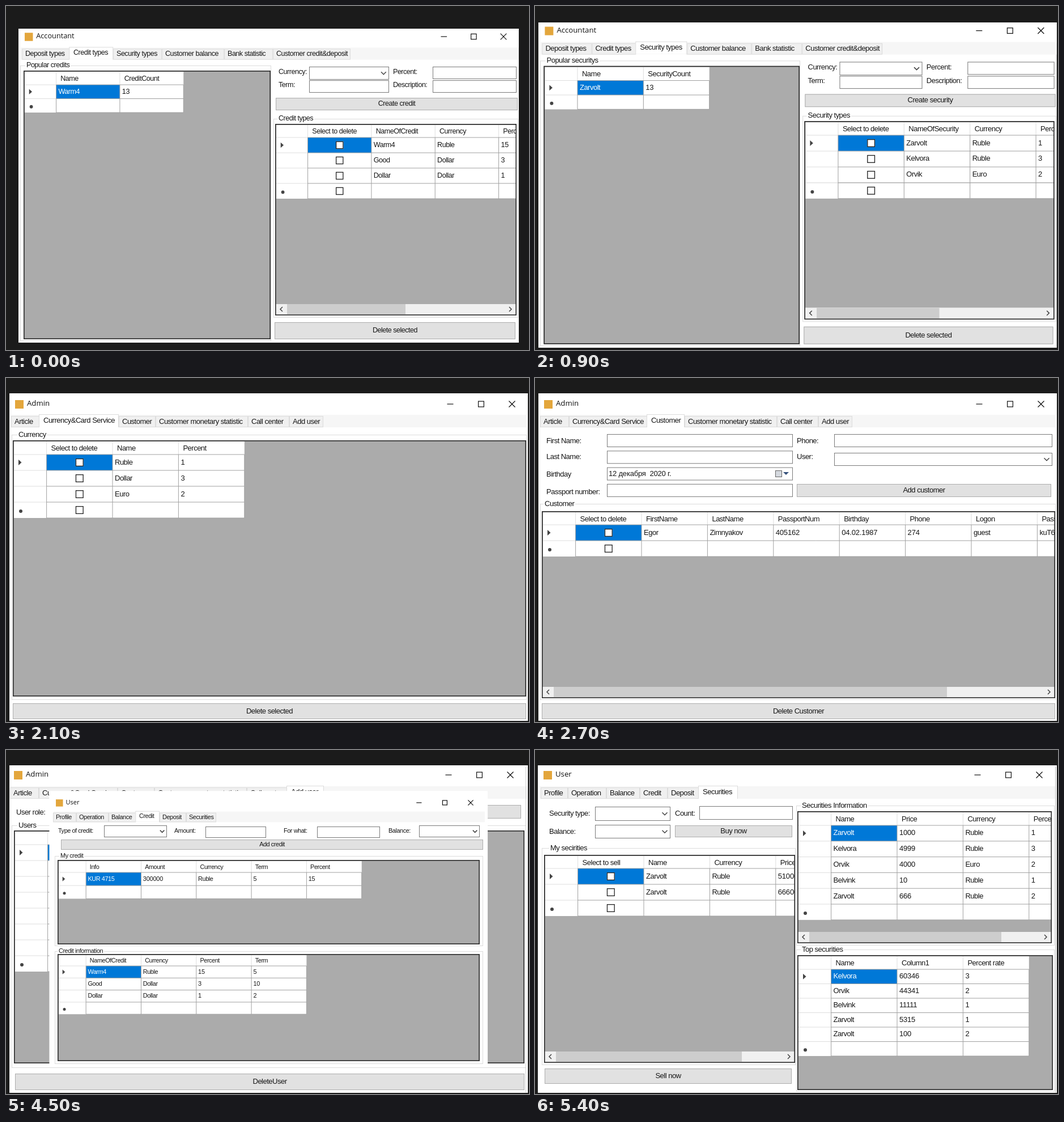
Animation of 923 by 607 pixels, one loop 5.7 s. Source, as an HTML page with a canvas:

```html
<!DOCTYPE html>
<html lang="en">
<head>
<meta charset="utf-8">
<title>Bank desktop tour</title>
<style>
html, body { margin: 0; width: 100%; height: 100%; overflow: hidden; background: #1b1b1b; }
canvas { display: block; }
</style>
</head>
<body>
<canvas id="stage" width="923" height="607"></canvas>
<script>
const c = document.getElementById('stage').getContext('2d');
const STEP = 300;
const BLUE = '#0078d7';
const ACCOUNTANT = 'Deposit types|Credit types|Security types|Customer balance|Bank statistic|Customer credit&deposit';
const ADMIN = 'Article|Currency&Card Service|Customer|Customer monetary statistic|Call center|Add user';
const USER = 'Profile|Operation|Balance|Credit|Deposit|Securities';
let S = 1; // scale of text and grid columns in the current window

function rect(x, y, w, h, fill, line, width = 1) {
  if (fill) { c.fillStyle = fill; c.fillRect(x, y, w, h); }
  if (line) {
    c.strokeStyle = line;
    c.lineWidth = width;
    c.strokeRect(x + width / 2, y + width / 2, w - width, h - width);
  }
}

function path(points, color, width = 1) {
  c.beginPath();
  points.forEach(([x, y]) => c.lineTo(x, y));
  c.strokeStyle = color;
  c.lineWidth = width;
  c.stroke();
}

function poly(points, color) {
  c.beginPath();
  points.forEach(([x, y]) => c.lineTo(x, y));
  c.fillStyle = color;
  c.fill();
}

function dot(x, y, r, color = '#111') {
  c.beginPath();
  c.arc(x, y, r, 0, 7);
  c.fillStyle = color;
  c.fill();
}

function text(s, x, y, color = '#161616', align = 'left') {
  c.font = `${13 * S}px "Liberation Sans", Arial, sans-serif`;
  c.letterSpacing = `${(/^\d/.test(s) ? -0.2 : -0.5) * S}px`;
  c.textBaseline = 'middle';
  c.textAlign = align;
  c.fillStyle = color;
  c.fillText(s, x, y);
}

function chevron(x, y, turns, size = 4) {
  c.save();
  c.translate(x, y);
  c.rotate(turns * Math.PI / 2);
  path([[-size, -size / 2], [0, size / 2], [size, -size / 2]], '#444', 1.5);
  c.restore();
}

function field(x, y, r, b, value = '') {
  rect(x, y, r - x, b - y, '#fff', '#7a7a7a');
  text(value, x + 3, (y + b) / 2);
}

function combo(x, y, r, b, value) {
  field(x, y, r, b, value);
  chevron(r - 10 * S, (y + b) / 2, 0, 4.5 * S);
}

function button(x, y, r, b, label, focus) {
  rect(x, y, r - x, b - y, '#e1e1e1', focus ? BLUE : '#adadad', focus ? 2.5 : 1);
  text(label, (x + r) / 2, (y + b) / 2, undefined, 'center');
}

function group(label, x, y, left, right, bottom) {
  rect(left, y, right - left, bottom - y, null, '#dcdcdc');
  text(label, x, y);
  const w = c.measureText(label).width;
  rect(x - 2, y - 7, w + 4, 14, '#fff');
  text(label, x, y);
}

function scrollbar(x, y, length, from, to, vertical) {
  const w = 18;
  if (vertical) {
    rect(x, y, w, length, '#f0f0f0');
    rect(x, from, w, to - from, '#cdcdcd');
    chevron(x + w / 2, y + 10, 2);
    chevron(x + w / 2, y + length - 9, 0);
  } else {
    rect(x, y, length, w, '#f0f0f0');
    rect(from, y, to - from, w, '#cdcdcd');
    chevron(x + 10, y + w / 2, 1);
    chevron(x + length - 10, y + w / 2, 3);
  }
}

// hs and vs hold the start and end of the scroll thumbs
function grid(x, y, r, b, head, row, names, rows, { check = false, star = true, hs, vs } = {}) {
  const w = r - x, h = b - y;
  const cols = names.split('|');
  const x0 = x + 2, y0 = y + 2, first = x0 + 57.6 * S, cw = 116.4 * S;
  const count = rows.length + (star ? 1 : 0);
  const right = first + cols.length * cw, bottom = y0 + head + count * row;
  c.save();
  c.beginPath();
  c.rect(x, y, w, h);
  c.clip();
  rect(x, y, w, h, '#ababab');
  rect(x0, y0, right - x0, bottom - y0, '#fff');
  cols.forEach((name, i) => {
    const left = first + i * cw, lines = name.split('\n');
    path([[left, y0], [left, y0 + head]], '#dedede');
    lines.forEach((line, k) =>
      text(line, left + 8 * S, y0 + head / 2 + (k - (lines.length - 1) / 2) * 15 + 1));
  });
  for (let j = 0; j < count; j++) {
    const top = y0 + head + j * row, mid = top + row / 2;
    const cells = (rows[j] || '').split('|');
    path([[x0, top], [first, top]], '#dedede');
    if (!j) rect(first, top, cw, row, BLUE);
    cols.forEach((_, i) => {
      const left = first + i * cw;
      if (check && !i) rect(left + cw / 2 - 7 * S, mid - 7 * S, 14 * S, 14 * S, '#fff', '#222', 1.3);
      else text(cells[i] || '', left + 4 * S, mid, i || j ? undefined : '#fff');
    });
  }
  for (let j = 0; j <= count; j++) {
    const top = y0 + head + j * row;
    path([[first, top], [right, top]], '#a0a0a0');
  }
  for (let i = 0; i <= cols.length; i++) {
    const left = first + i * cw;
    path([[left, y0 + head], [left, bottom]], '#a0a0a0');
  }
  const my = y0 + head + row / 2, mx = x0 + 8 * S;
  poly([[mx, my - 5 * S], [mx + 5.5 * S, my], [mx, my + 5 * S]], '#444');
  if (star) dot(x0 + 12 * S, bottom - row / 2 + 2, 3 * S, '#444');
  if (hs) {
    rect(x, b - 20, w, 20, '#f0f0f0');
    scrollbar(x + 1, b - 20, w - 2 - (vs ? 18 : 0), ...hs);
  }
  if (vs) scrollbar(r - 19, y + 2, h - 22, ...vs, true);
  c.restore();
  rect(x, y, w, h, null, '#2b2b2b', 1.6);
}

function frame(x, y, r, b, title, iconX, midY, closeX, body = '#fff') {
  rect(x, y, r - x, b - y, body);
  rect(x, y, r - x, 37 * S, '#fff');
  rect(iconX, midY - 7 * S, 15 * S, 15 * S, '#e3a63c');
  c.font = `${13.2 * S}px "Open Sans", "Noto Sans", sans-serif`;
  c.letterSpacing = '0px';
  c.textBaseline = 'middle';
  c.textAlign = 'left';
  c.fillStyle = '#111';
  c.fillText(title, iconX + 21 * S, midY);
  const a = 5.5 * S, min = closeX - 109 * S, max = closeX - 54.5 * S;
  path([[min - a, midY], [min + a, midY]], '#111', 1.2);
  rect(max - a, midY - a, 2 * a, 2 * a, null, '#111', 1.2);
  path([[closeX - a, midY - a], [closeX + a, midY + a]], '#111', 1.2);
  path([[closeX - a, midY + a], [closeX + a, midY - a]], '#111', 1.2);
}

// y is the middle of the resting tabs; the last x is where the strip of tabs ends
function tabs(names, xs, y, active, left, right) {
  const half = 10 * S;
  rect(left, y - half - 2, right - left, 2 * half + 2, '#f6f6f6');
  names.split('|').forEach((name, i) => {
    const on = i === active, x = xs[i] - (on ? 8 : 6) * S;
    const end = xs[i + 1] - (i === 5 ? 0 : 6 * S);
    const top = y - half - (on ? 3 : 0);
    rect(x, top, end - x, y + half - top, on ? '#fff' : '#f0f0f0', '#dcdcdc');
    if (on) rect(x + 1, y + half - 1, end - x - 2, 3, '#fff');
    text(name, xs[i], on ? y - 2 : y);
  });
}

function zoom(k, dx, dy, draw) {
  c.save();
  c.translate(dx, dy);
  c.scale(k, k);
  draw();
  c.restore();
}

function withScale(k, draw) {
  const old = S;
  S = k;
  draw();
  S = old;
}

const typesPage = (active, noun, rows) => withScale(0.965, () => {
  const low = noun.toLowerCase();
  frame(22, 40, 905, 594, 'Accountant', 33, 54, 878);
  tabs(ACCOUNTANT, [34, 119, 195, 281, 391, 477, 608], 85, active, 26, 905);
  group(`Popular ${low}s`, 36, 105, 25, 468, 591);
  grid(31, 114, 467, 588, 23, 24.5, `Name|${noun}Count`, [rows[0].split('|')[1] + '|13']);
  text('Currency:', 481, 117);
  combo(535, 107, 676, 130);
  text('Percent:', 683, 117);
  field(753, 107, 901, 129);
  text('Term:', 481, 140);
  field(535, 131, 676, 153);
  text('Description:', 683, 140);
  field(753, 131, 901, 153);
  button(476, 162, 903, 184, `Create ${low}`);
  group(`${noun} types`, 481, 199, 472, 904, 550);
  grid(475, 208, 901, 546, 22, 27, `Select to delete|NameOf${noun}|Currency|Percent|Term`, rows,
    { check: true, hs: [496, 705] });
  button(474, 558, 899, 588, 'Delete selected');
});

const CREDITS = ['|Warm4|Ruble|15|5', '|Good|Dollar|3|10', '|Dollar|Dollar|1|2'];
const DEPOSITS = ['|Dollar|Dollar|5|2', '|Сберегательный|Ruble|7|5', '|Сберегательный1|Ruble|4|3'];
const SHARES = ['|Zarvolt|Ruble|1|5', '|Kelvora|Ruble|3|2', '|Orvik|Euro|2|2'];
const enlarged = draw => zoom(1.036, -16.8, -12.4, draw);

function accountant(active, xs, iconX) {
  frame(6, 29, 921, 604, 'Accountant', iconX, 46, 892);
  tabs(ACCOUNTANT, xs, 78, active, 10, 919);
}

const F = 'Fedor|Lunkin|8', V = 'Vsevolod|Tuchin|3', E = 'Egor|Zimnyakov|3', K = 'Konstantin|Vetluhin|8',
  R = 'Ruslan|Kamyshov|8', G = 'Svyatogor|Drozdnov|8', M = 'Maksim|Mroz|2', L = 'Leonid|Pluzhin|2';

function customerDeals() {
  accountant(5, [17, 105, 183, 274, 387, 478, 615], 17);
  const list = people => people.map(p => '|' + p);
  const names = kind => `Select to\nterminate ${kind}|FirstName|LastName|PassportNum`;
  group('Customer credits', 24, 101, 14, 463, 555);
  grid(19, 110, 459, 547, 38, 27.95, names('credit'), list([F, V, V, ...Array(11).fill(E)]),
    { check: true, hs: [39, 186], vs: [131, 467] });
  group('Customer deposits', 478, 101, 469, 918, 555);
  grid(474, 110, 913, 548, 38, 25.6, names('deposit'),
    list([K, F, R, G, M, L, 'TEST_UPDATE|TEST|7', K, F, R, G, M, K, V, V]),
    { check: true, hs: [494, 640], vs: [131, 361] });
  button(18, 564, 457, 594, 'Terminate Credit');
  button(475, 564, 914, 594, 'Terminate Deposit');
}

function customerBalance() {
  accountant(3, [17, 105, 183, 274, 387, 475, 610], 17);
  group('Customer balance', 24, 101, 14, 918, 598);
  grid(19, 110, 913, 592, 23, 25.6, 'FirstName|LastName|Currency|Balance',
    [F, V, E, K, R].map((p, i) => p.slice(0, -2) + (i % 2 ? '|Dollar|100' : '|Ruble|5469500')));
}

function bankStatistic() {
  accountant(4, [19, 106, 185, 275, 388, 477, 611], 18);
  group('Share of currency', 21, 98, 12, 467, 340);
  grid(15, 107, 464, 340, 23, 25.5, 'Name|Type|Percent', [
    'Ruble|Balance|64,28571428571', 'Dollar|Balance|35,71428571428',
    'Ruble|Credit|92,85714285714', 'Dollar|Credit|7,14285714285',
    'Ruble|Deposite|65,21739130434', 'Dollar|Deposite|34,78260869565']);
  group('Bank payments from deposit', 480, 98, 470, 919, 340);
  grid(472, 107, 918, 340, 23, 27.8, 'Name|DepositName|Count', [
    'Dollar|Dollar|1028100450', 'Ruble|Сберегательный|3385466', 'Ruble|Сберегательный1|1099956']);
  rect(8, 328, 912, 16, '#fff');
  group('Money turnover', 25, 343, 12, 919, 603);
  grid(16, 355, 918, 601, 23, 25.5, 'Name|DepositAmount|BalanceAmount|CreditAmount', [
    ...['100', '105', '5000605', '5469500'].map(n => `Ruble|4435422|${n}|210300000`),
    ...['100', '137'].map(n => `Dollar|34270015|${n}|4000000`)]);
}

function admin(active) {
  frame(6, 27, 921, 605, 'Admin', 16, 46, 893);
  tabs(ADMIN, [15, 66, 205, 270, 433, 506, 560], 77, active, 9, 919);
}

function adminList(active, label, names, rows) {
  admin(active);
  group(label, 22, 100, 10, 919, 568);
  grid(12, 110, 918, 562, 23, 28, names, rows, { check: true });
  button(12, 574, 918, 602, 'Delete selected');
}

function customers() {
  admin(2);
  ['First Name:', 'Last Name:', 'Birthday', 'Passport number:'].forEach((label, i) => {
    const y = 99 + i * 29.3;
    text(label, 20, [111, 139, 170, 201][i]);
    field(127, y, 455, y + 23, i === 2 ? '12 декабря  2020 г.' : '');
  });
  rect(424, 163, 12, 12, '#d5d9df', '#666');
  poly([[438, 166], [448, 166], [443, 171]], '#34507a');
  text('Phone:', 462, 111);
  field(528, 99, 913, 122);
  text('User:', 462, 139);
  combo(528, 132, 913, 155);
  button(462, 187, 911, 210, 'Add customer');
  group('Customer', 17, 222, 9, 919, 568);
  grid(12, 235, 918, 565, 22, 28,
    'Select to delete|FirstName|LastName|PassportNum|Birthday|Phone|Logon|Password',
    ['|Egor|Zimnyakov|405162|04.02.1987|274|guest|kuT6'], { check: true, hs: [33, 727] });
  button(12, 574, 918, 602, 'Delete Customer');
}

function addUser() {
  frame(6, 27, 921, 605, 'Admin', 14, 44, 890);
  tabs(ADMIN, [13, 64, 203, 268, 431, 503, 561], 76, 5, 8, 919);
  text('User role:', 18, 110);
  combo(90, 98, 440, 121);
  button(460, 97, 909, 121, 'Add user');
  group('Users', 22, 133, 10, 918, 561);
  grid(14, 142, 915, 553, 23, 28, 'Select to delete|Logon|Password|Role',
    Array(7).fill('|guest|kuT6|Customer'), { check: true });
  button(16, 571, 915, 600, 'DeleteUser');
  path([[917.5, 29], [917.5, 604]], '#cfcfcf');
}

function authentication() {
  addUser();
  withScale(1.07, () => {
    frame(94, 71, 835, 562, 'Authentication', 104, 90, 808, '#f0f0f0');
    text('Logon:', 270, 251);
    field(364, 237, 628, 262, 'guest');
    text('Password:', 270, 292);
    field(364, 283, 628, 308);
    [372, 380.5, 389].forEach(x => dot(x, 296, 3.4));
    text('Account type:', 270, 339);
    combo(364, 327, 628, 353, 'Customer');
    button(270, 422, 624, 450, 'Log in', true);
  });
}

const userPage = (active, noun) => withScale(0.836, () => {
  const low = noun.toLowerCase();
  frame(79, 74, 848, 556, 'User', 88, 93, 820);
  tabs(USER, [88, 129, 186, 235, 276, 323, 371], 119, active, 84, 845);
  text(`Type of ${low}:`, 92, 143);
  combo(173, 133, 284, 154);
  text('Amount:', 297, 143);
  field(352, 135, 459, 155);
  text('For what:', 490, 143);
  field(549, 135, 660, 155);
  text('Balance:', 675, 143);
  combo(729, 133, 836, 154);
  button(97, 158, 842, 176, `Add ${low}`);
  group(`My ${low}`, 96, 187, 86, 842, 346);
  grid(91, 194, 836, 343, 20, 23.2, 'Info|Amount|Currency|Term|Percent', ['KUR 4715|300000|Ruble|5|15']);
  group(`${noun} information`, 93, 355, 86, 842, 554);
  grid(91, 360, 836, 549, 19, 21.3, `NameOf${noun}|Currency|Percent|Term`,
    ['Warm4|Ruble|15|5', 'Good|Dollar|3|10', 'Dollar|Dollar|1|2']);
});

const deposit = () => zoom(1.19, -89, -61, () => userPage(4, 'Deposit'));

function operation() {
  addUser();
  zoom(1.006, -3, -2, () => userPage(1, 'Operation'));
}

function securities() {
  frame(5, 27, 921, 605, 'User', 15, 44, 890);
  tabs(USER, [16, 64, 132, 191, 240, 296, 358], 76, 5, 8, 919);
  text('Security type:', 25, 112);
  combo(106, 100, 239, 125);
  text('Count:', 247, 112);
  field(290, 99, 455, 123);
  text('Balance:', 25, 144);
  combo(106, 132, 239, 156);
  button(247, 133, 454, 154, 'Buy now');
  group('My secirities', 27, 173, 12, 460, 556);
  grid(16, 185, 459, 552, 22, 28, 'Select to sell|Name|Currency|Price',
    ['|Zarvolt|Ruble|51000', '|Zarvolt|Ruble|66600'], { check: true, hs: [37, 365] });
  button(17, 562, 453, 589, 'Sell now');
  group('Securities Information', 471, 98, 461, 917, 345);
  grid(463, 108, 912, 341, 23, 27.8, 'Name|Price|Currency|Percent', [
    'Zarvolt|1000|Ruble|1', 'Kelvora|4999|Ruble|3', 'Orvik|4000|Euro|2',
    'Belvink|10|Ruble|1', 'Zarvolt|666|Ruble|2'], { hs: [484, 823] });
  group('Top securities', 471, 352, 461, 917, 603);
  grid(463, 362, 914, 600, 23, 25.5, 'Name|Column1|Percent rate', [
    'Kelvora|60346|3', 'Orvik|44341|2', 'Belvink|11111|1', 'Zarvolt|5315|1', 'Zarvolt|100|2']);
  path([[918.5, 29], [918.5, 604]], '#bbb');
}

const slides = [
  () => typesPage(1, 'Credit', CREDITS),
  () => enlarged(() => typesPage(0, 'Deposit', DEPOSITS)),
  customerDeals,
  () => enlarged(() => typesPage(2, 'Security', SHARES)),
  customerBalance,
  bankStatistic,
  () => adminList(0, 'Article', 'Select to delete|Name|Description', ['|Balance|Ruble', '|Credit|Dollar']),
  () => adminList(1, 'Currency', 'Select to delete|Name|Percent', ['|Ruble|1', '|Dollar|3', '|Euro|2']),
  () => adminList(4, 'Call center', 'Select to delete|FirstName|LastName', ['|Egor|Zimnyakov']),
  customers,
  () => adminList(3, 'Customer', 'Select to delete|FirstName|LastName|Balance', ['|Egor|Zimnyakov|100']),
  addUser,
  authentication,
  () => { addUser(); userPage(0, 'Profile'); },
  operation,
  () => { operation(); userPage(3, 'Credit'); },
  deposit,
  () => { deposit(); zoom(0.97, 14, 10, () => userPage(2, 'Balance')); },
  securities
];

let shown = -1;
function tick(now) {
  const index = Math.floor(now / STEP) % slides.length;
  if (index !== shown) {
    shown = index;
    rect(0, 0, 923, 607, '#1b1b1b');
    slides[index]();
  }
  requestAnimationFrame(tick);
}
tick(performance.now());
</script>
</body>
</html>
```
